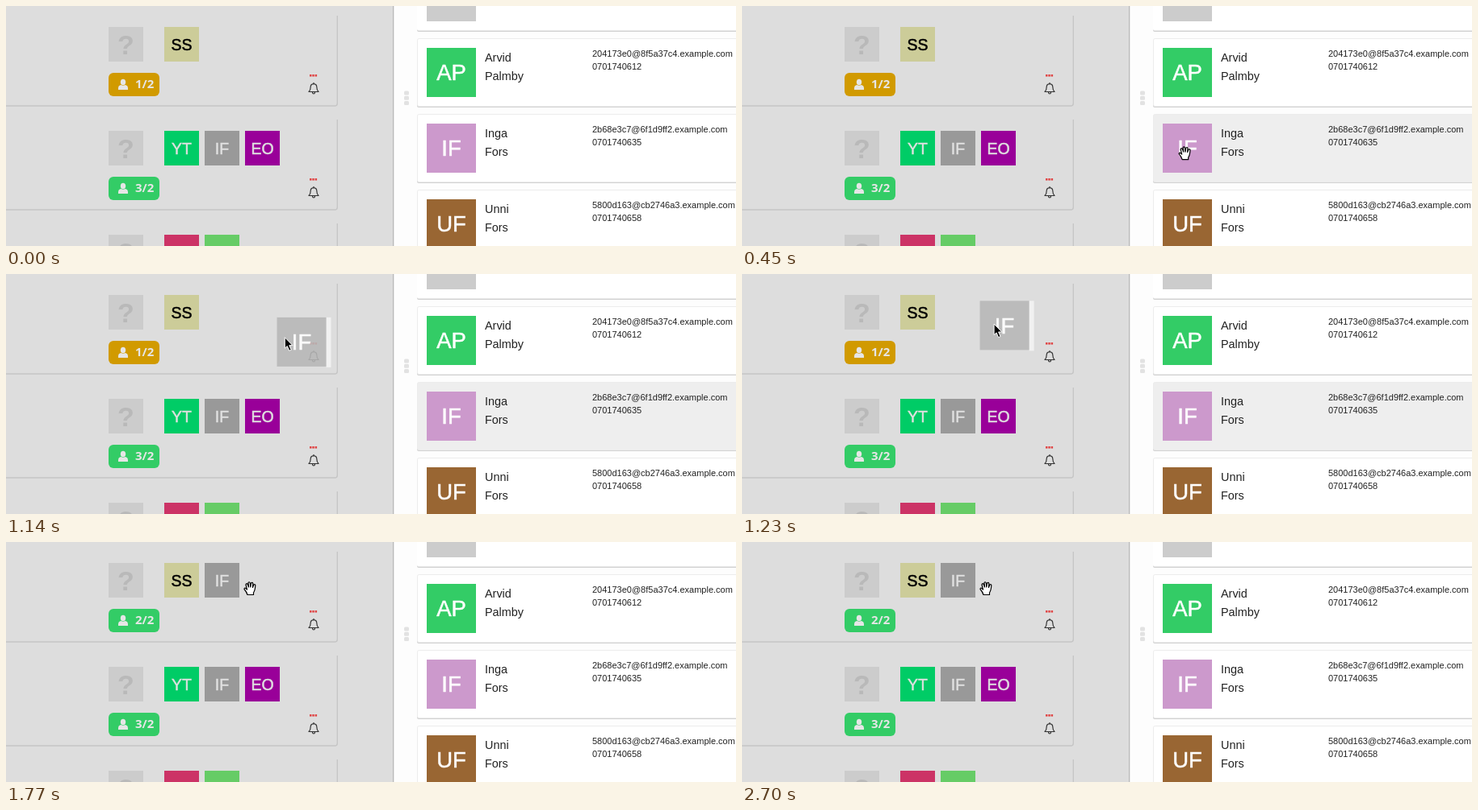
Animation of 904x298 px, one loop 2.73 s. Source, as an HTML page:

```html
<!DOCTYPE html>
<html lang="en">
<head>
<meta charset="utf-8">
<style>
  html, body { margin: 0; width: 100%; height: 100%; overflow: hidden; background: #fff; }
  svg { display: block; font-family: "Liberation Sans", Arial, sans-serif; }
  .initials { text-anchor: middle; stroke-width: .5; }
  .count { font: bold 15px "Noto Sans", sans-serif; fill: #e6e6e6; }
  .unknown { font-weight: bold; font-size: 34px; text-anchor: middle; fill: #b9b9b9; }
  .name { font-size: 14.4px; fill: #222; }
  .contact { font-size: 11px; fill: #222; }
</style>
</head>
<body>
<svg id="stage" width="904" height="298" viewBox="0 0 904 298"></svg>
<script>
const LOOP = 2730, STEP = 30;
const GRAB = 900, ARRIVE = 1314, EXPAND = 1260, DROP = 1680;
const stage = document.getElementById('stage');

const rect = (x, y, w, h, fill, extra = '') =>
  `<rect x="${x}" y="${y}" width="${w}" height="${h}" fill="${fill}" ${extra}/>`;

const text = (x, y, cls, value, extra = '') =>
  `<text x="${x}" y="${y}" class="${cls}" ${extra}>${value}</text>`;

function avatar(x, y, size, fill, initials, ink) {
  const fontSize = size > 50 ? 27.5 : 19.5;
  return rect(x, y, size, size, fill) +
    text(x + size / 2, y + size / 2 + fontSize * .36, 'initials', initials,
      `font-size="${fontSize}" fill="${ink}" stroke="${ink}"`);
}

const bell = `<g fill="none" stroke="#333" stroke-width="1.2" stroke-linejoin="round">
  <path d="M375 106.500q2.200-2 2.200-6 0-3.500 3.800-3.900 3.800.4 3.800 3.900 0 4 2.200 6zM381 96.500v-1.500M379.500 107q0 2 1.500 2t1.500-2"/></g>`;
const dots = [376, 379.3, 382.6].map(x => rect(x, 85, 2.5, 2.6, '#e04848')).join('');
const userIcon = `<g fill="#e6e6e6"><ellipse cx="145" cy="94.500" rx="3.200" ry="3.800"/>
  <path d="M139 104v-2q0-3.500 3.500-4 2.500 1.500 5 0 3.500.5 3.500 4v2z"/></g>`;

// One shift on the left; positions are those of the topmost row.
function shift(id, top, staff) {
  return `<g id="${id}" transform="translate(0 ${top})">
    <path class="edge" fill="none" stroke="#c6c6c6" stroke-width="1.400"/>
    ${rect(127, 26, 43, 43, '#ccc')}${text(148.5, 60, 'unknown', '?')}
    ${staff.map(([fill, initials, ink = '#e0e0e0'], i) =>
      avatar(196 + 50 * i, 26, 43, fill, initials, ink)).join('')}
    <g class="extra"></g>
    ${rect(127, 83, 63, 29, '#3c6', 'rx="6" class="badge"')}${userIcon}
    ${text(160, 102, 'count', '3/2')}${dots}${bell}</g>`;
}

// One contact card on the right.
function contact(id, top, fill, initials, first, last, mail, phone) {
  return rect(509, top + 1, 400, 84, '#d2d2d2', 'rx="2"') +
    rect(509.5, top - .5, 400, 84, '#fff', `rx="2" stroke="#ececec" id="${id}"`) +
    avatar(521, top + 11, 61, fill, initials, '#fff') +
    text(593, top + 28, 'name', first) + text(593, top + 51, 'name', last) +
    text(726, top + 22, 'contact', mail) + text(726, top + 38, 'contact', phone);
}

stage.innerHTML = `
  ${rect(0, 0, 904, 298, '#fdfdfd')}${rect(0, 0, 480, 298, '#ddd')}${rect(479, 0, 1.3, 298, '#b8b8b8')}
  ${shift('first', 0, [['#cc9', 'SS', '#000']])}
  ${shift('second', 129, [['#0c6', 'YT'], ['#999', 'IF'], ['#909', 'EO']])}
  ${shift('third', 258, [['#c36', 'YT'], ['#6c6', 'ER']])}
  ${[0, 1, 2].map(i => rect(493, 105.5 + 6.3 * i, 6, 5, '#e2e2e2', 'rx="1.5"')).join('')}
  ${rect(509, -9, 400, 41, '#d2d2d2', 'rx="2"')}${rect(509, -9, 400, 39.5, '#fff', 'rx="2"')}${rect(521, -42, 61, 61, '#ccc')}
  ${contact('cardA', 41, '#3c6', 'AP', 'Arvid', 'Palmby', '204173e0@8f5a37c4.example.com', '0701740612')}
  ${contact('cardB', 135, '#c9c', 'IF', 'Inga', 'Fors', '2b68e3c7@6f1d9ff2.example.com', '0701740635')}
  ${contact('cardC', 229, '#963', 'UF', 'Unni', 'Fors', '5800d163@cb2746a3.example.com', '0701740658')}
  <g id="ghost" opacity=".88">${rect(61, 0, 6, 62, '#f4f4f4')}${avatar(0, 0, 61, '#b7b7b7', 'IF', '#fff')}</g>
  <path id="arrow" fill="#000" stroke="#fff" d="M0 0V13.500l3-2.700 2.500 5.800 2.500-1.100-2.500-5.600h4.200z"/>
  <path id="hand" fill="#fff" stroke="#000" stroke-width="1.200" stroke-linejoin="round"
    d="M-3 8.500Q-4 5-7 1.500q0-2 2-1l1.500 1.500L-5-4q.5-2 2-1l1.500 4-.5-5.500q1-1.500 2.200 0L.8-1l.8-5q1.300-1.300 2.200.2L3.500-.5l1.300-3.500q1.800-1 2 .8Q6.500 3 4.500 6v2.500z"/>`;

const el = id => document.getElementById(id);
const [first, second, third, cardB, ghost, arrow, hand] =
  ['first', 'second', 'third', 'cardB', 'ghost', 'arrow', 'hand'].map(el);
first.querySelector('.extra').innerHTML = avatar(246, 26, 43, '#999', 'IF', '#e0e0e0');

const show = (node, on) => node.setAttribute('visibility', on ? 'visible' : 'hidden');
const move = (node, x, y) => node.setAttribute('transform', `translate(${x} ${y})`);
const easeOut = u => 1 - (1 - u) ** 2;
const mix = (a, b, u) => a.map((v, i) => v + (b[i] - v) * u);
const progress = (t, from, to) => Math.min(1, Math.max(0, (t - from) / (to - from)));

function pointer(t) {
  const entry = [594, 312], edge = [566, 214], grip = [547, 180], target = [302, 57];
  if (t < 270) return mix(entry, edge, progress(t, 0, 270));
  if (t < GRAB) return mix(edge, grip, easeOut(progress(t, 270, 510)));
  return mix(grip, target, easeOut(progress(t, GRAB, ARRIVE)));
}

function draw(t) {
  const dragging = t >= GRAB && t < DROP, dropped = t >= DROP;
  const grow = t >= EXPAND && t < DROP ? 43 : 0;
  for (const row of [first, second, third]) {
    const bottom = 124 + (row === first ? grow : 0);
    row.querySelector('.edge').setAttribute('d', `M410.300 12V${bottom - 3}q0 3-3 3H0`);
  }
  move(second, 0, 129 + grow);
  move(third, 0, 258 + grow);
  show(first.querySelector('.extra'), dropped);
  first.querySelector('.badge').setAttribute('fill', dropped ? '#3c6' : '#d19a00');
  first.querySelector('.count').textContent = dropped ? '2/2' : '1/2';
  cardB.setAttribute('fill', t >= 300 && !dropped ? '#eee' : '#fff');

  const [x, y] = pointer(t);
  const [gx, gy] = pointer(t - STEP);   // the dragged tile trails the pointer
  move(ghost, gx - 26, gy - 33);
  move(arrow, x, y);
  move(hand, x, y);
  const open = dropped || (t >= 330 && t < GRAB);
  show(ghost, dragging);
  show(hand, open);
  show(arrow, !open);
}

function frame() {
  draw(Math.floor(performance.now() % LOOP / STEP) * STEP);
  requestAnimationFrame(frame);
}
frame();
</script>
</body>
</html>
```
